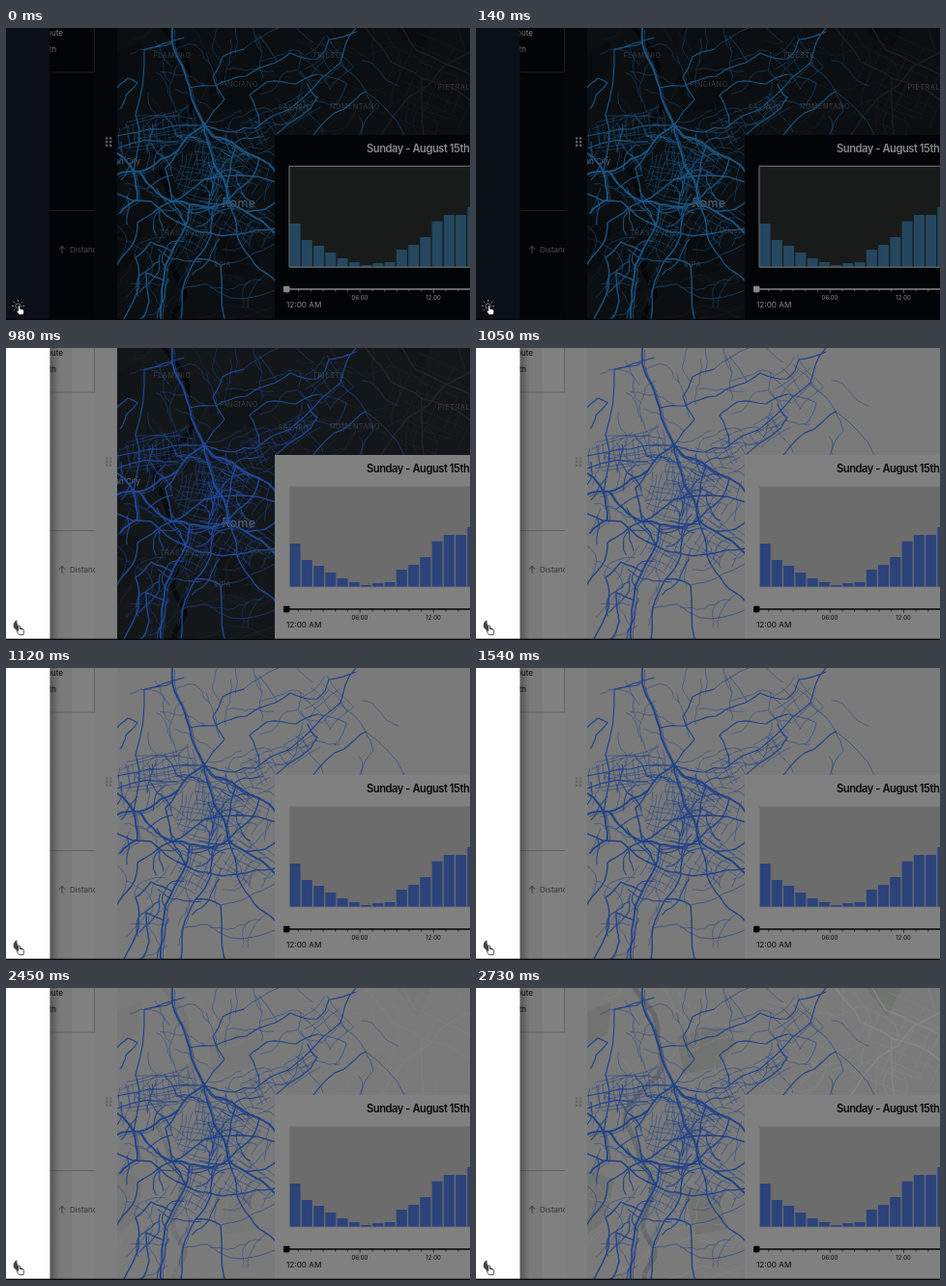
Write an HTML page that moves like this. It is 480x303 px and loops after 3150 ms.

```html
<!DOCTYPE html>
<html lang="en">
<head>
<meta charset="utf-8">
<title>Map theme switch</title>
<style>
html, body { margin: 0; width: 100%; height: 100%; overflow: hidden; background: #000; }
svg { display: block; width: 100vw; height: 100vh; font-family: Inter, "Liberation Sans", sans-serif; }
#base path, #roads path, .line { fill: none; stroke-linejoin: round; stroke-linecap: round; }
#roads path { stroke: var(--road); }
.side { fill: var(--side); }
.panel { fill: var(--panel); }
.text { fill: var(--text); }
.soft { fill: var(--soft); }
.rule { stroke: var(--rule); fill: none; }
.axis { stroke: var(--axis); fill: none; }
</style>
</head>
<body>
<svg id="stage" viewBox="0 0 480 303" preserveAspectRatio="none">
  <defs>
    <clipPath id="mapClip"><path d="M115 0H480V302H115Z"/></clipPath>
    <clipPath id="listClip"><path d="M45 0H92V302H45Z"/></clipPath>
    <clipPath id="tileClip"><path d="M115 144H218V283H115Z"/></clipPath>
    <linearGradient id="shade">
      <stop offset="0" stop-color="#000" stop-opacity=".3"/>
      <stop offset="1" stop-color="#000" stop-opacity="0"/>
    </linearGradient>
  </defs>

  <g clip-path="url(#mapClip)">
    <rect x="115" width="365" height="303" fill="var(--map)"/>
    <g id="base"></g>
    <g id="labels" fill="#3b4146" font-size="7" letter-spacing=".7" text-anchor="middle"></g>
    <g id="roads"></g>
  </g>

  <g id="list">
    <rect class="panel" x="45" width="70" height="303"/>
    <rect x="45" width="23" height="303" fill="#000" opacity="var(--fold)"/>
    <rect x="92" width="23" height="303" fill="var(--strip)"/>
    <path class="rule" d="M45 46H91.5V0M45 189.5H92"/>
    <g clip-path="url(#listClip)">
      <g class="text" font-size="8" text-anchor="end">
        <text x="59" y="8">Route</text>
        <text x="52" y="25">Length</text>
      </g>
      <text class="soft" x="66" y="233" font-size="8">Distance</text>
      <path class="line" d="M58 233.5V226.5M55 229.5L58 226.5L61 229.5" stroke="var(--soft)"/>
    </g>
    <g id="grip" fill="var(--grip)"></g>
  </g>

  <g id="chart">
    <rect class="panel" x="278" y="111" width="202" height="192"/>
    <text class="text" x="373" y="129" font-size="11.2" font-weight="600" letter-spacing="-.47">Sunday - August 15th, 2021</text>
    <rect x="293" y="143.5" width="190" height="104.5" fill="var(--plot)"/>
    <g id="bars" fill="var(--bar)"></g>
    <path d="M293 248V143.3H480M293 248.2H480" fill="none" stroke="var(--frame)"/>
    <path class="axis" d="M290 271H480" stroke-width="1.3"/>
    <path class="axis" id="ticks" stroke-width=".7"/>
    <rect x="287" y="267.7" width="6.4" height="6.6" rx=".8" fill="var(--axis)"/>
    <g class="text" font-size="6" text-anchor="middle">
      <text x="366" y="282">06:00</text>
      <text x="442" y="282">12:00</text>
    </g>
    <text class="text" x="290" y="290" font-size="8.2">12:00 AM</text>
  </g>

  <rect class="side" width="45.5" height="303"/>
  <rect x="45.5" width="10" height="303" fill="url(#shade)"/>
  <rect y="301.7" width="480" height="1.3" fill="#050607"/>

  <g id="sun" class="line" stroke="#777">
    <circle cx="12.5" cy="288.5" r="2.6"/>
    <path id="rays"/>
  </g>
  <path id="moon" d="M11.5 282.2A5.8 5.8 0 1 0 18 291.2A7 7 0 0 1 11.5 282.2Z" fill="#40434a"/>
  <path d="M12.7 288.4Q13.6 287.4 14.5 288.5V291.4L17.2 291.9Q18.8 292.2 18.6 293.8L18 297.6H13.6L11 294Q10.8 292.8 12.7 293.4Z"
    fill="#fff" stroke="#111" stroke-width=".7"/>
</svg>
<script>
const $ = id => document.getElementById(id);
const LOOP = 3150;

let seed = 41;
const rnd = () => (seed = (seed * 16807) % 2147483647) / 2147483647;
const jit = a => (rnd() - .5) * 2 * a;
const pt = (x, y) => `${x.toFixed(1)} ${y.toFixed(1)}`;
const path = (d, w, o = 1) => `<path d="${d}" stroke-width="${w}" opacity="${o}"/>`;

// bends every straight segment a little, as streets do
function bend(d) {
  return d.split("M").filter(Boolean).map(run => {
    const pts = run.split("L").map(p => p.split(" ").map(Number));
    let out = `M${pt(...pts[0])}`;
    for (let i = 1; i < pts.length; i++) {
      const [ax, ay] = pts[i - 1], [bx, by] = pts[i];
      const bow = jit(.09);
      for (let k = 1; k <= 4; k++) {
        const f = k / 4, off = k < 4 ? bow * Math.sin(f * Math.PI) + jit(.025) : 0;
        out += `L${pt(ax + (bx - ax) * f - (by - ay) * off, ay + (by - ay) * f + (bx - ax) * off)}`;
      }
    }
    return out;
  }).join("");
}

// a slightly rotated block of streets with uneven ends
function grid(cx, cy, w, h, deg, nx, ny) {
  const a = deg * Math.PI / 180, c = Math.cos(a), s = Math.sin(a);
  const at = (x, y) => pt(cx + x * c - y * s, cy + x * s + y * c);
  let d = "";
  for (let i = 0; i <= nx; i++) {
    const x = (i / nx - .5) * w + jit(1.5);
    d += `M${at(x, -h / 2 + rnd() * h * .35)}L${at(x + jit(2), h / 2 - rnd() * h * .35)}`;
  }
  for (let i = 0; i <= ny; i++) {
    const y = (i / ny - .5) * h + jit(1.5);
    d += `M${at(-w / 2 + rnd() * w * .35, y)}L${at(w / 2 - rnd() * w * .35, y + jit(2))}`;
  }
  return d;
}

// a wandering lane
function lane(x, y, dir, steps, len) {
  let d = `M${pt(x, y)}`;
  for (let i = 0; i < steps; i++) {
    dir += jit(.55);
    x += Math.cos(dir) * len;
    y += Math.sin(dir) * len;
    d += `L${pt(x, y)}`;
  }
  return d;
}

function lanes(n, x, y, w, h, steps, len) {
  let d = "";
  for (let i = 0; i < n; i++) d += lane(x + rnd() * w, y + rnd() * h, rnd() * 6.3, steps, len);
  return d;
}

const main = bend([
  "M115 152L138 149L160 136L178 127L205 101",
  "M205 101L216 113L238 122L262 135L279 150",
  "M205 101L212 128L222 152L230 178L247 190L279 214",
  "M138 149L152 166L172 180L190 183L214 186L230 178",
  "M190 183L186 205L172 232L163 262L160 302",
  "M172 0L178 32L190 62L205 101",
  "M115 130L132 150L136 178L118 192"
].join(""));
const side = bend([
  "M134 90L143 22L184 10M143 22L172 15M134 90L132 150",
  "M115 62L126 52L136 57L124 70L118 84",
  "M115 112L160 105L205 101M115 125L178 118",
  "M190 62L216 60L248 50L272 38L294 26L322 32",
  "M205 101L226 74L214 50L224 30L246 22",
  "M205 101L236 108L258 104L284 88L312 68L346 36L362 0",
  "M262 100L252 70L270 56L300 58L322 48",
  "M280 110L306 91L322 72L312 58",
  "M322 32L334 12L362 4M372 66L350 84L318 111"
].join(""));
const lower = bend([
  "M178 127L165 145L172 180L186 205L208 212",
  "M238 122L232 150L230 178M262 135L250 160L230 178",
  "M230 178L238 202L244 226L262 250L278 262",
  "M247 190L268 188L279 180M208 212L240 214L278 208",
  "M172 232L150 222L134 238L137 270L122 302",
  "M163 262L145 254L148 284L140 302M183 270L181 302",
  "M115 245L130 226L136 202L152 192L172 180",
  "M214 186L212 215L196 240L183 270M196 240L222 246L226 302",
  "M115 172L150 180L186 205M172 180L205 157L279 160"
].join(""));
const outer = bend("M346 38L372 66L380 86L366 111M372 66L412 111M246 22L282 0M280 34L262 8M322 48L352 57L340 80M222 246L250 238L278 224M183 270L208 266L232 280L278 272");
const blocks = grid(160, 106, 82, 36, -8, 13, 6) + grid(240, 150, 66, 48, 38, 8, 6) +
  grid(204, 152, 52, 64, 14, 10, 11) + grid(262, 108, 38, 36, -32, 5, 5) +
  grid(330, 38, 46, 46, -42, 4, 4) + grid(194, 213, 44, 38, 28, 6, 5) +
  grid(250, 205, 48, 36, 30, 4, 4) + grid(302, 82, 40, 24, -36, 4, 3);
const thin = blocks + lanes(55, 118, 90, 160, 210, 7, 6) + lanes(26, 120, 8, 250, 85, 8, 6);
const mid = lanes(20, 168, 112, 85, 90, 6, 6) + lanes(7, 115, 118, 40, 65, 5, 6) +
  lanes(9, 130, 200, 130, 90, 8, 6);

$("roads").innerHTML = path(bend(thin), .75, .68) + path(outer, .8, .8) + path(mid, 1.15, .9) +
  path(side, 1.15) + path(lower, 1.4) + path(main, 1.9) +
  `<g transform="translate(2.6 2.2)">${path(main, .8, .8)}</g>`;

// pale streets, green areas and river below the routes
const streets = lanes(70, 115, 0, 365, 302, 10, 8);
const river = "M164 0C176 18 188 24 188 46S199 82 187 92S166 112 157 124S165 153 168 170S185 190 181 214S165 243 180 263S172 286 174 303";
const highways = "M372 0L398 35L430 52L480 75M388 111L416 72L452 40L480 25M410 0L424 23L480 48M432 111L430 52";
const basemap =
  `<path d="M208 50L250 40L270 56L252 82L214 90ZM115 24L140 14L136 48L115 58ZM115 190L142 198L136 240L115 255ZM214 206L250 216L262 250L226 256ZM404 0H440L426 30Z" style="fill:var(--park)"/>` +
  `<path d="${river}" stroke="var(--river)" stroke-width="5"/>` +
  `<path d="${streets}" stroke="var(--street)" stroke-width=".6"/>` +
  `<path d="${grid(440, 60, 90, 90, 24, 7, 7)}" stroke="var(--street)" stroke-width=".5"/>` +
  `<path d="${bend(highways)}" stroke="var(--street)" stroke-width="1.4"/>`;
$("base").innerHTML = `<g id="tile" clip-path="url(#tileClip)">${basemap}</g><g id="full">${basemap}</g>`;

const label = (x, y, s, more = "") => `<text x="${x}" y="${y}" ${more}>${s}</text>`;
$("labels").innerHTML = label(172, 31, "FLAMINIO") + label(241, 61, "PINCIANO") +
  label(299, 85, "SALARIO") + label(361, 84, "NOMENTANO") + label(334, 31, "TRIESTE") +
  label(471, 64, "PIETRALATA") + label(185, 215, "TRASTEVERE") + label(224, 248, "RIPA") +
  label(267, 213, "Colosseo", 'letter-spacing="0"') +
  label(139, 141, "Vatican City", 'text-anchor="end" letter-spacing="0" font-size="8" fill="#686d72"') +
  label(241, 186, "Rome", 'letter-spacing=".3" font-size="12.5" fill="#6a7076"');

const tops = [203, 220, 226, 233, 239, 243, 246, 244, 243, 230, 225, 217, 200.5, 194, 194, 186];
const PITCH = 12.25;
$("bars").innerHTML = tops.map((y, i) =>
  `<rect x="${293.6 + i * PITCH}" y="${y}" width="11" height="${248 - y}"/>`).join("");
$("ticks").setAttribute("d", tops.map((_, i) =>
  `M${290 + i * 12.7} 271v${i % 6 ? 2.5 : 4}`).join(""));
$("grip").innerHTML = [0, 1, 2, 3, 4, 5].map(i =>
  `<rect x="${103 + i % 2 * 4}" y="${113.3 + (i >> 1) * 3.7}" width="2.3" height="2.3"/>`).join("");
$("rays").setAttribute("d", [...Array(8)].map((_, i) => {
  const c = Math.cos(i * Math.PI / 4), s = Math.sin(i * Math.PI / 4);
  return `M${12.5 + c * 4.8} ${288.5 + s * 4.8}L${12.5 + c * 6.3} ${288.5 + s * 6.3}`;
}).join(""));

const uiDark = {
  side: "#0a1015", panel: "#020508", strip: "#04070a", fold: 0, text: "#888b8e", soft: "#4b4f53",
  rule: "#1b1f22", grip: "#5d6164", plot: "#191b1a", bar: "#24475f", frame: "#777a79", axis: "#85888a"
};
const uiLight = {
  side: "#fff", panel: "#808080", strip: "#7e7e7e", fold: .05, text: "#080808", soft: "#343434",
  rule: "#626262", grip: "#646464", plot: "#6c6c6c", bar: "#2c4379", frame: "#7a7a7a", axis: "#050505"
};
const mapDark = { map: "#0b0f12", road: "#1b5482", park: "#090c0f", river: "#040608", street: "#1a1e22" };
const mapMixed = { map: "#13171a", road: "#204896", park: "#101416", river: "#080b0d", street: "#23272b" };
const mapLight = { map: "#7a7a7a", road: "#1f4288", park: "#717371", river: "#66696b", street: "#868686" };

const stage = $("stage");
let shown = "";
function show(...sets) {
  for (const set of sets)
    for (const k in set) stage.style.setProperty("--" + k, set[k]);
}

function draw(ms) {
  const t = ms % LOOP;
  const light = t >= 980, pale = t >= 1050;
  const key = `${light}${pale}`;
  if (key !== shown) {
    shown = key;
    show(light ? uiLight : uiDark, pale ? mapLight : light ? mapMixed : mapDark);
    $("sun").style.display = light ? "none" : "";
    $("moon").style.display = light ? "" : "none";
  }
  const step = Math.floor(t / 70) * 70;
  const ease = (from, to) => Math.min(1, Math.max(0, (step - from) / (to - from)));
  $("labels").style.opacity = pale ? 0 : .82 + .18 * ease(0, 210);
  $("full").style.opacity = pale ? ease(2380, 2590) : 1;
  $("tile").style.opacity = pale && t >= 2310 && t < 2590 ? .3 : 0;
}

function tick() {
  draw(performance.now());
  requestAnimationFrame(tick);
}
tick();
</script>
</body>
</html>
```
